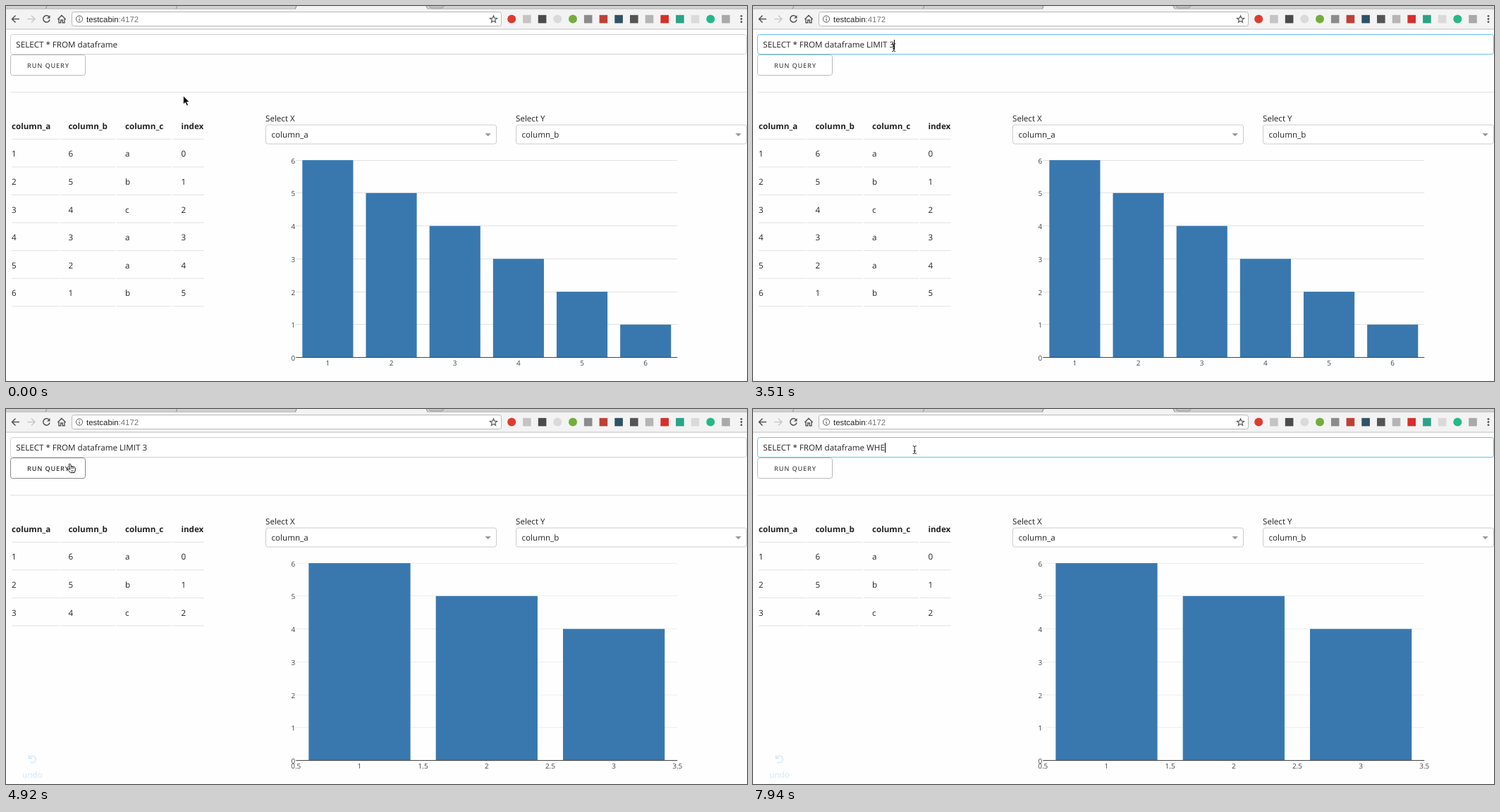
Write an HTML page that moves like this. It is 1051x533 px and loops after 8000 ms.

```html
<!DOCTYPE html>
<html lang="en">
<head>
<meta charset="utf-8">
<title>Query demo</title>
<style>
  html, body { margin: 0; width: 100%; height: 100%; overflow: hidden; background: #fefefe; }
  svg { display: block; }
  text { font-family: "Open Sans", "Noto Sans", sans-serif; font-size: 11.63px; fill: #222; white-space: pre; text-rendering: geometricPrecision; }
  .bold { font-weight: 700; }
  .tick { font-size: 9.97px; fill: #444; }
  .url { font-family: Roboto, "Liberation Sans", sans-serif; font-family: "Liberation Sans", Arial, sans-serif; font-size: 11.4px; }
  .button { font-size: 9.14px; font-weight: 600; letter-spacing: .83px; }
</style>
</head>
<body>
<svg id="stage" width="1051" height="533" viewBox="0 0 1051 533"></svg>
<script>
const LOOP = 8000;
const stage = document.getElementById('stage');

function el(tag, attrs, parent = stage) {
  const node = document.createElementNS('http://www.w3.org/2000/svg', tag);
  for (const key in attrs) node.setAttribute(key, attrs[key]);
  parent.appendChild(node);
  return node;
}
const group = (parent) => el('g', {}, parent);
const rect = (x, y, width, height, fill, parent, more) =>
  el('rect', { x, y, width, height, fill, ...more }, parent);
const box = (x, y, w, h, stroke, r = 3) =>
  rect(x + .5, y + .5, w - 1, h - 1, '#fff', stage, { stroke, rx: r });
const path = (d, stroke, width = 1.5, parent, fill = 'none') =>
  el('path', { d, stroke, 'stroke-width': width, fill }, parent);
function label(x, y, str, cls = '', parent, more) {
  const node = el('text', { x, y, class: cls, ...more }, parent);
  node.textContent = str;
  return node;
}
const show = (node, on) => node.setAttribute('visibility', on ? 'visible' : 'hidden');

function drawBrowser() {
  rect(0, 0, 1051, 5, '#d2d2d2');
  rect(0, 4, 1051, 29, '#f3f3f3');
  rect(0, 3.5, 1051, 1, '#b2b2b2');
  path('M411 5L413 0H596L598 5Z', 'none', 0, stage, '#f3f3f3');
  for (const x of [56, 241, 410]) path(`M${x} 4l2 -4`, '#8d8d8d', 1);
  path('M596 0l2 4', '#8d8d8d', 1);
  path('M600 0q1 3 4 3H617q3 0 4 -3', '#999', 1, stage, '#c3c3c3');
  rect(0, 32.5, 1051, 1, '#c2c2c2');

  path('M19 18.5H9M13.5 13.5L8.5 18.5L13.5 23.5', '#555');
  path('M30.500 18.5H40.500M36 13.5L41 18.5L36 23.5', '#c9c9c9');
  path('M61 15.2A4.700 4.700 0 1 0 62 19.500', '#555');
  path('M62.500 13V17.500H58Z', 'none', 0, stage, '#555');
  path('M73.300 19L79 13.300L84.700 19M75 18V23.800H77.700V20H80.300V23.800H83V18', '#555', 1.400);

  box(93, 8, 610, 21, '#b9b9b9');
  el('circle', { cx: 104, cy: 18.5, r: 4.6, fill: 'none', stroke: '#555' });
  rect(103.5, 18, 1.1, 3.2, '#555');
  rect(103.5, 15.8, 1.1, 1.2, '#555');
  const url = label(114, 22.5, 'testcabin', 'url');
  el('tspan', { fill: '#777' }, url).textContent = ':4172';

  let star = '';
  for (let i = 0; i < 10; i++) {
    const r = i % 2 ? 2.3 : 5.3, a = i * Math.PI / 5;
    star += (i ? 'L' : 'M') + (691.5 + r * Math.sin(a)) + ' ' + (19 - r * Math.cos(a));
  }
  path(star + 'Z', '#555', 1.1);

  const addons = ['#de3b30', '#c4c4c4', '#4b4b4b', '#dadada', '#74ad3c', '#8b8b8b', '#bd4037',
    '#2f5264', '#555', '#b5b5b5', '#d72f2a', '#2aa387', '#dadada', '#25b987', '#a9a9a9'];
  addons.forEach((color, i) => {
    const cx = 717.2 + i * 21.7;
    if ([0, 3, 4, 13].includes(i)) el('circle', { cx, cy: 18.5, r: 6, fill: color });
    else rect(cx - 5.8, 12.8, 11.6, 11.6, color);
  });
  for (const cy of [14.3, 18.5, 22.7]) el('circle', { cx: 1043, cy, r: 1.4, fill: '#555' });
}

function drawDropdown(x, title, value) {
  label(x, 164, title);
  box(x, 168.5, 328, 28, '#ccc');
  label(x + 8.5, 187, value);
  path(`M${x + 311.500} 181h8.400l-4.200 4.200Z`, 'none', 0, stage, '#999');
}

const ROW = 39.6;
const COLS = [[8, 67, 8], [76.3, 79, 88.4], [157, 78, 169], [236.7, 44.3, 248.4]];
function drawRow(cells, i, parent, cls) {
  COLS.forEach(([x, w, textX], c) => {
    label(textX, 174.7 + i * ROW, cells[c], cls, parent);
    rect(x, 188.7 + i * ROW, w, 1, '#e1e1e1', parent);
  });
}

function drawChart(count, tickStep, gridColor) {
  const g = group();
  const left = 411.3, width = 541, zero = 499.6, unit = 46.75;
  const step = width / count;
  for (let v = 0; v <= 6; v++) {
    const y = zero - v * unit;
    if (v) rect(left, Math.floor(y), width, 1, gridColor, g);
    label(410.3, y + 4.4, v, 'tick', g, { 'text-anchor': 'end' });
  }
  for (let i = 0; i < count; i++) {
    const h = (6 - i) * unit;
    rect(left + (i + .1) * step, zero - h, step * .8, h, '#3978af', g);
  }
  const first = tickStep < 1 ? .5 : 1;
  for (let v = first; v <= count + .5; v += tickStep)
    label(left + (v - .5) * step, 510.6, v, 'tick', g, { 'text-anchor': 'middle' });
  rect(left, 499, width, 1, '#444', g);
  return g;
}

function drawUndo() {
  const g = group();
  path('M33.200 495.500A4.900 4.900 0 1 1 34.500 502', '#cfe5f6', 1.300, g);
  path('M32.500 492V496.500H37', '#cfe5f6', 1.300, g);
  label(23.3, 524, 'undo', '', g, { style: 'fill:#cfe5f6' });
  return g;
}

function drawPointers() {
  const arrow = group(), beam = group(), hand = group();
  path('M0 0V12.500L3 9.800L5.200 14.500L7.300 13.500L5.200 9H9Z', '#fff', 1, arrow, '#000');
  path('M-2.500 -5.500Q0 -5.500 0 -4V4Q0 5.500 -2.500 5.500M2.500 -5.500Q0 -5.500 0 -4M0 4Q0 5.500 2.500 5.500M-1.500 1.500H1.500', '#222', 1, beam);
  path('M-1.200 .5Q0 -.8 1 .5L2.200 4L3.500 3.500L5 4L6.200 4.200L7.600 5.500L7.800 9L6.500 12.500H1L-2.800 8.200Q-3.200 6.500 -1 7.200L.5 8Z', '#111', 1, hand, '#fff');
  path('M2.200 4L3 7M4.500 4L5 7M2.500 9V11M4.500 9V11', '#111', .8, hand);
  return { arrow, beam, hand };
}

drawBrowser();
const input = box(6, 40, 1045, 29, '#d1d1d1');
const query = label(14.3, 59, '');
const caret = rect(0, 48, 1, 14, '#000');
const button = box(6, 69, 107, 30, '#bbb');
const buttonText = label(30, 87.6, 'RUN QUERY', 'button');
rect(6, 122, 1045, 1, '#e1e1e1');

drawRow(['column_a', 'column_b', 'column_c', 'index'], 0, stage, 'bold');
const lateRows = group();
[...'abcaab'].forEach((c, i) =>
  drawRow([i + 1, 6 - i, c, i], i + 1, i < 3 ? stage : lateRows));
drawDropdown(368, 'Select X', 'column_a');
drawDropdown(723, 'Select Y', 'column_b');
const fullChart = drawChart(6, 1, '#e2e2e2');
const limitedChart = drawChart(3, .5, '#eee');
const undo = drawUndo();
const pointers = drawPointers();

// time, text after the base query, caret visible
const BASE = 'SELECT * FROM dataframe';
const EDITS = [
  [0, '', 0], [1940, '', 1], [2390, '', 0], [2480, ' ', 1], [2800, ' L', 1], [2980, ' LIM', 1],
  [3160, ' LIMI', 1], [3250, ' LIMIT', 1], [3330, ' LIMIT ', 1], [3510, ' LIMIT 3', 1],
  [3950, ' LIMIT 3', 0], [4480, ' LIMIT 3', 1], [4650, ' LIMIT 3', 0], [6250, ' LIMIT 3', 1],
  [6790, ' LIMIT 3', 0], [7150, ' LIMIT ', 1], [7320, ' ', 1], [7680, ' W', 1],
  [7850, ' WH', 1], [7940, ' WHE', 1]
];
// start time, number of steps, end point
const MOVES = [[700, 7, 199.7, 59], [3950, 7, 90.5, 78], [5630, 4, 229.2, 58]];
const STEP = 86;

function pointerAt(t) {
  let x = 251.3, y = 127.5;
  for (const [start, n, toX, toY] of MOVES) {
    if (t < start) break;
    const p = Math.min(1, (Math.floor((t - start) / STEP) + 1) / n);
    const e = p * p * (3 - 2 * p);
    x += (toX - x) * e;
    y += (toY - y) * e;
  }
  return { x, y };
}

function render(t) {
  const [, text, caretOn] = EDITS.filter(e => e[0] <= t).pop();
  const focused = t >= 1940 && t < 4650 || t >= 6250;
  query.textContent = BASE + text;
  caret.setAttribute('x', Math.round(14.3 + query.getComputedTextLength()));
  show(caret, caretOn);
  input.setAttribute('stroke', focused ? '#62c4e8' : '#d1d1d1');

  const { x, y } = pointerAt(t);
  const onButton = x < 113 && y > 69 && y < 99;
  const kind = onButton ? 'hand' : y < 69 ? 'beam' : 'arrow';
  for (const name in pointers) show(pointers[name], name === kind);
  pointers[kind].setAttribute('transform', `translate(${x} ${y})`);

  const active = onButton || t >= 4650 && t < 6250;
  button.setAttribute('stroke', active ? '#888' : '#bbb');
  buttonText.style.fill = active ? '#333' : '#555';

  show(lateRows, t < 4830);
  show(undo, t >= 4830);
  show(fullChart, t < 4920);
  show(limitedChart, t >= 4920);
}

const began = performance.now();
function tick() {
  render((performance.now() - began) % LOOP);
  requestAnimationFrame(tick);
}
tick();
</script>
</body>
</html>
```
